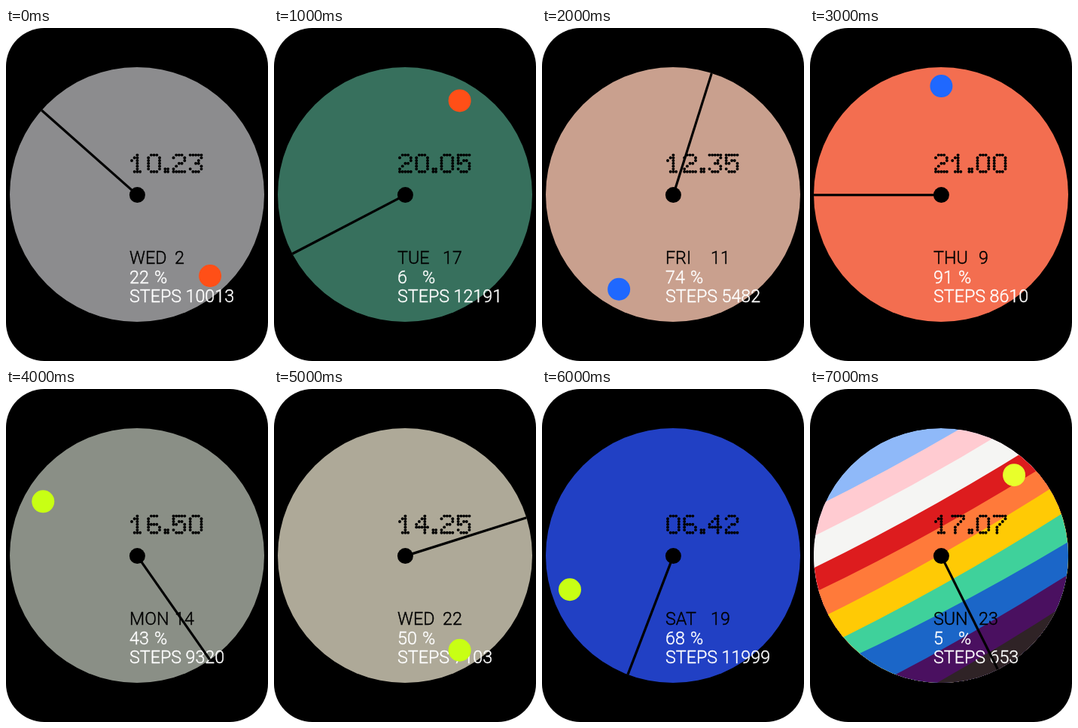
Recreate the animation shown at these times as an HTML page. Size 348 px wide and 442 px high, loop 8000 ms.

```html
<!DOCTYPE html>
<html lang="en">
<head>
<meta charset="utf-8">
<title>Watch face</title>
<style>
  html, body { margin: 0; width: 100%; height: 100%; overflow: hidden; background: #fff; }
  svg { display: block; width: 348px; height: 442px; }
  text { font: 300 23.3px Roboto, "Liberation Sans", sans-serif; stroke-width: 0.4px; }
  .scene { visibility: hidden; animation: show 8s step-end infinite; }
  @keyframes show {
    0% { visibility: visible; }
    12.5%, 100% { visibility: hidden; }
  }
</style>
</head>
<body>
<svg id="watch" viewBox="0 0 348 442">
  <defs><clipPath id="dial"><circle cx="174" cy="221" r="169"/></clipPath></defs>
  <rect width="348" height="442" rx="51"/>
</svg>
<script>
const CX = 174, CY = 221, R = 169;
const HUB_X = 174.4, HUB_Y = 221.6, ORBIT = 144.5;
const ORANGE = '#ff4f17', BLUE = '#1f68ff', LIME = '#c8ff14', YELLOW = '#e8ff2b';

// Dot-matrix digits, five columns by seven rows
const GLYPHS = {
  0: ' ### /#   #/#   #/#   #/#   #/#   #/ ### ',
  1: '  #  / ##  /# #  /  #  /  #  /  #  / ### ',
  2: ' ### /#   #/    #/  ## / #   /#    /#####',
  3: '#####/    #/   # /  ## /    #/#   #/ ### ',
  4: '   # /  ## / # # /#  # /#####/   # /   # ',
  5: '#####/#    /# ## /##  #/    #/#   #/ ### ',
  6: ' ### /#    /#    /#### /#   #/#   #/ ### ',
  7: '#####/    #/   # /  #  / #   / #   / #   ',
  8: ' ### /#   #/#   #/ ### /#   #/#   #/ ### ',
  9: ' ### /#   #/#   #/ ####/    #/    #/ ### ',
  '.': '/////##/##'
};

const SCENES = [
  { time: '10.23', day: 'WED', date: 2, battery: 22, steps: 10013, face: '#8c8c8e', dot: ORANGE },
  { time: '20.05', day: 'TUE', date: 17, battery: 6, steps: 12191, face: '#37705d', dot: ORANGE },
  { time: '12.35', day: 'FRI', date: 11, battery: 74, steps: 5482, face: '#c9a08e', dot: BLUE },
  { time: '21.00', day: 'THU', date: 9, battery: 91, steps: 8610, face: '#f36e50', dot: BLUE },
  { time: '16.50', day: 'MON', date: 14, battery: 43, steps: 9320, face: '#8a8f86', dot: LIME },
  { time: '14.25', day: 'WED', date: 22, battery: 50, steps: 7103, face: '#aea998', dot: LIME },
  { time: '06.42', day: 'SAT', date: 19, battery: 68, steps: 11999, face: '#2140c4', dot: LIME },
  { time: '17.07', day: 'SUN', date: 23, battery: 5, steps: 653, face: 'stripes', dot: YELLOW }
];

// Upper edge of each stripe: colour, y at the left side, y at the right side
const STRIPES = [
  ['#ffcbd1', 160, -39],
  ['#f5f5f3', 198, 0],
  ['#dd1c1e', 240, 43],
  ['#ff7a3a', 273, 79],
  ['#ffca05', 311, 114],
  ['#3fd19b', 351, 157],
  ['#1b66c8', 381, 200],
  ['#4a1060', 436, 243],
  ['#2f2326', 479, 281]
];

const circle = (x, y, r, fill) => `<circle cx="${x}" cy="${y}" r="${r}" fill="${fill}"/>`;
const label = (x, y, str, fill) => `<text x="${x}" y="${y}" fill="${fill}" stroke="${fill}">${str}</text>`;

function polar(degrees, radius) {
  const a = degrees * Math.PI / 180;
  return [HUB_X + radius * Math.sin(a), HUB_Y - radius * Math.cos(a)];
}

function matrix(str) {
  const pitch = 3.7;
  let column = 0, out = '';
  for (const ch of str) {
    GLYPHS[ch].split('/').forEach((row, r) => {
      [...row].forEach((cell, c) => {
        if (cell === '#') out += circle(167 + (column + c) * pitch, 168.6 + r * pitch, 1.95, '#000');
      });
    });
    column += ch === '.' ? 3 : 6;
  }
  return out;
}

function face(fill) {
  if (fill !== 'stripes') return circle(CX, CY, R, fill);
  const bands = STRIPES.map(([colour, left, right]) =>
    `<path fill="${colour}" d="M0 ${left}Q174 ${(left + right) / 2 + 14} 348 ${right}V442H0Z"/>`);
  return `<g clip-path="url(#dial)">${circle(CX, CY, R, '#8fb9f9')}${bands.join('')}</g>`;
}

function scene(s, i) {
  const [hours, minutes] = s.time.split('.').map(Number);
  const [hx, hy] = polar((hours + minutes / 60) * 30, R + 4);
  const [mx, my] = polar(minutes * 6, ORBIT);
  return `<g class="scene" style="animation-delay:${i - SCENES.length}s">
    ${face(s.face)}
    ${matrix(s.time)}
    ${label(164, 313, s.day, '#000')}${label(224, 313, s.date, '#000')}
    ${label(164, 339, s.battery, '#fff')}${label(197, 339, '%', '#fff')}
    ${label(164, 364, 'STEPS', '#fff')}${label(238.5, 364, s.steps, '#fff')}
    <path d="M${HUB_X} ${HUB_Y}L${hx} ${hy}" stroke="#000" stroke-width="3.2" clip-path="url(#dial)"/>
    ${circle(HUB_X, HUB_Y, 10.5, '#000')}
    ${circle(mx, my, 15, s.dot)}
  </g>`;
}

document.getElementById('watch').insertAdjacentHTML('beforeend', SCENES.map(scene).join(''));
</script>
</body>
</html>
```
